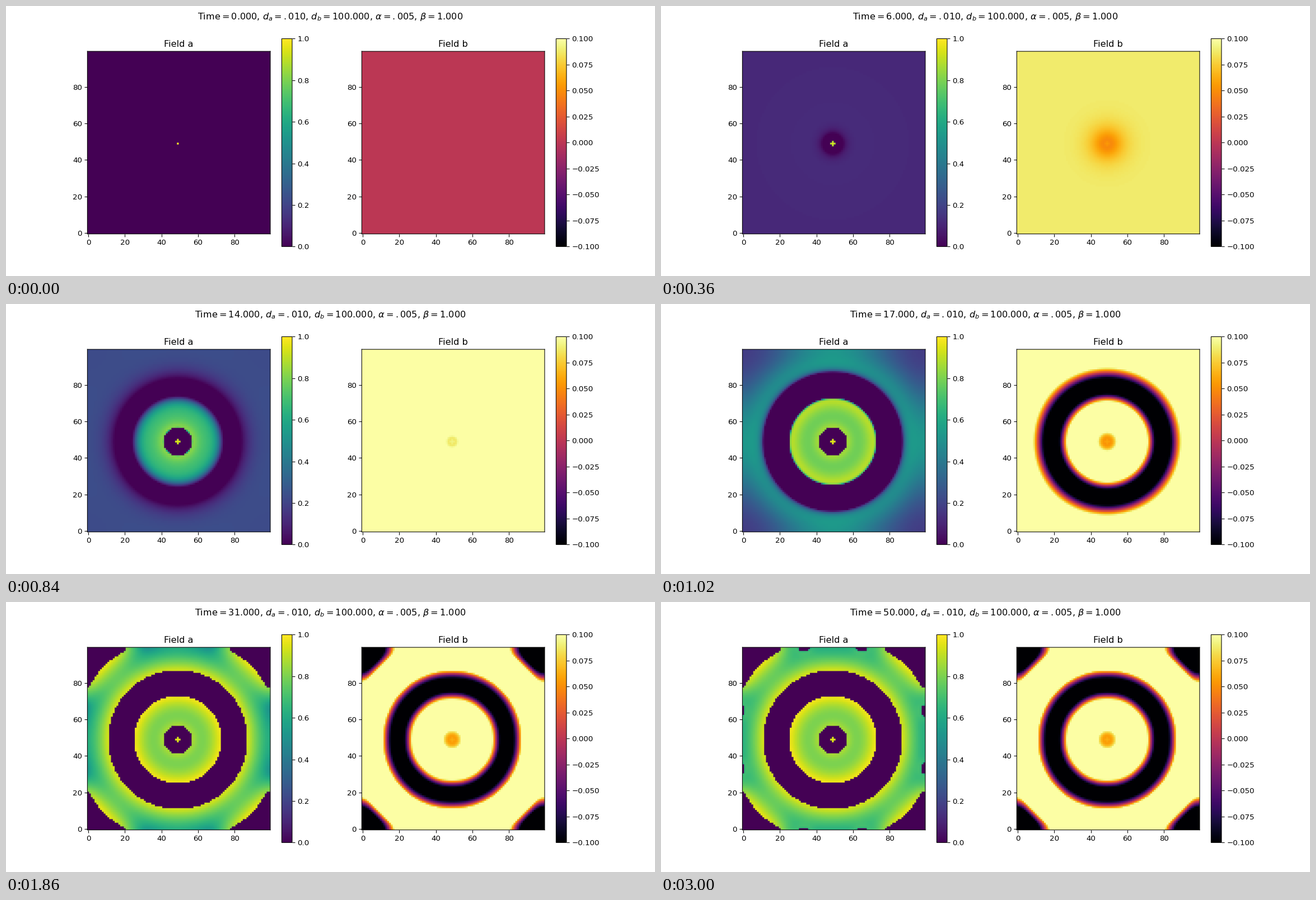
These frames come from a looping animation (1159 by 483 pixels, 3060 ms). A matplotlib script:

```python
import matplotlib.pyplot as plt
import numpy as np
from matplotlib.animation import FuncAnimation

WIDTH, HEIGHT, DPI = 1159, 483, 96
FRAMES, INTERVAL = 51, 60

# Reaction-diffusion on a periodic 100 x 100 grid, seeded at one cell
SIZE, SEED = 100, 49
HALF = SIZE // 2
DIFF_A, DIFF_B, ALPHA, BETA = 0.01, 100.0, 0.005, 1.0
DT, STEPS_PER_FRAME = 0.001, 1000

# Samples per cell side, so that cell edges come out slightly soft
SAMPLES = 3

plt.rcParams.update({
    "font.family": "DejaVu Sans",
    "font.size": 10.06,
    "path.snap": False,
})


def advance(fields, steps):
    """Euler steps on one mirrored quadrant with a ghost cell on each side."""
    inner = fields[:, 1:-1, 1:-1]
    a, b = inner
    diffusion = np.array([DIFF_A, DIFF_B]).reshape(2, 1, 1)
    for _ in range(steps):
        fields[:, 0] = fields[:, 2]
        fields[:, -1] = fields[:, -3]
        fields[:, :, 0] = fields[:, :, 2]
        fields[:, :, -1] = fields[:, :, -3]
        rate = fields[:, :-2, 1:-1] + fields[:, 2:, 1:-1]
        rate += fields[:, 1:-1, :-2]
        rate += fields[:, 1:-1, 2:]
        rate -= 4 * inner
        rate *= diffusion
        gap = a - b
        rate[1] += BETA * gap
        gap -= a * a * a
        gap += ALPHA
        rate[0] += gap
        rate *= DT
        inner += rate


def simulate():
    fields = np.zeros((2, HALF + 3, HALF + 3))
    fields[0, 1, 1] = 1.0
    history = [fields[:, 1:-1, 1:-1].copy()]
    for _ in range(FRAMES - 1):
        advance(fields, STEPS_PER_FRAME)
        history.append(fields[:, 1:-1, 1:-1].copy())
    return history


def unfold(quadrant):
    """Mirror a quadrant about the seed cell to fill the whole grid."""
    distance = np.abs(np.arange(SIZE) - SEED).repeat(SAMPLES)
    return quadrant[np.ix_(distance, distance)]


def heading(time):
    return (rf"Time$={time:.3f}$, $d_a=.010$, $d_b=100.000$, "
            r"$\alpha=.005$, $\beta=1.000$")


def add_panel(ax, title, cmap, low, high):
    edges = (-0.5, SIZE - 0.5)
    image = ax.imshow(unfold(history[0][0]), cmap=cmap, vmin=low, vmax=high,
                      origin="lower", extent=edges * 2,
                      interpolation="bilinear", interpolation_stage="rgba")
    ax.set_title(title)
    ax.set_xticks(range(0, SIZE, 20))
    ax.set_yticks(range(0, SIZE, 20))
    fig.colorbar(image, ax=ax)
    return image


history = simulate()
fig, axes = plt.subplots(1, 2, figsize=(WIDTH / DPI, HEIGHT / DPI), dpi=DPI)
# Default margins, moved half a pixel right and down
dx, dy = 0.5 / WIDTH, 0.5 / HEIGHT
fig.subplots_adjust(left=0.125 + dx, right=0.9 + dx,
                    bottom=0.11 - dy, top=0.88 - dy)
images = [
    add_panel(axes[0], "Field a", "viridis", 0, 1),
    add_panel(axes[1], "Field b", "inferno", -0.1, 0.1),
]
suptitle = fig.suptitle(heading(0))


def update(frame):
    for image, quadrant in zip(images, history[frame]):
        image.set_data(unfold(quadrant))
    suptitle.set_text(heading(frame))
    return [*images, suptitle]


animation = FuncAnimation(fig, update, frames=FRAMES, interval=INTERVAL,
                          repeat=True, repeat_delay=0, blit=False)
plt.show()
```
